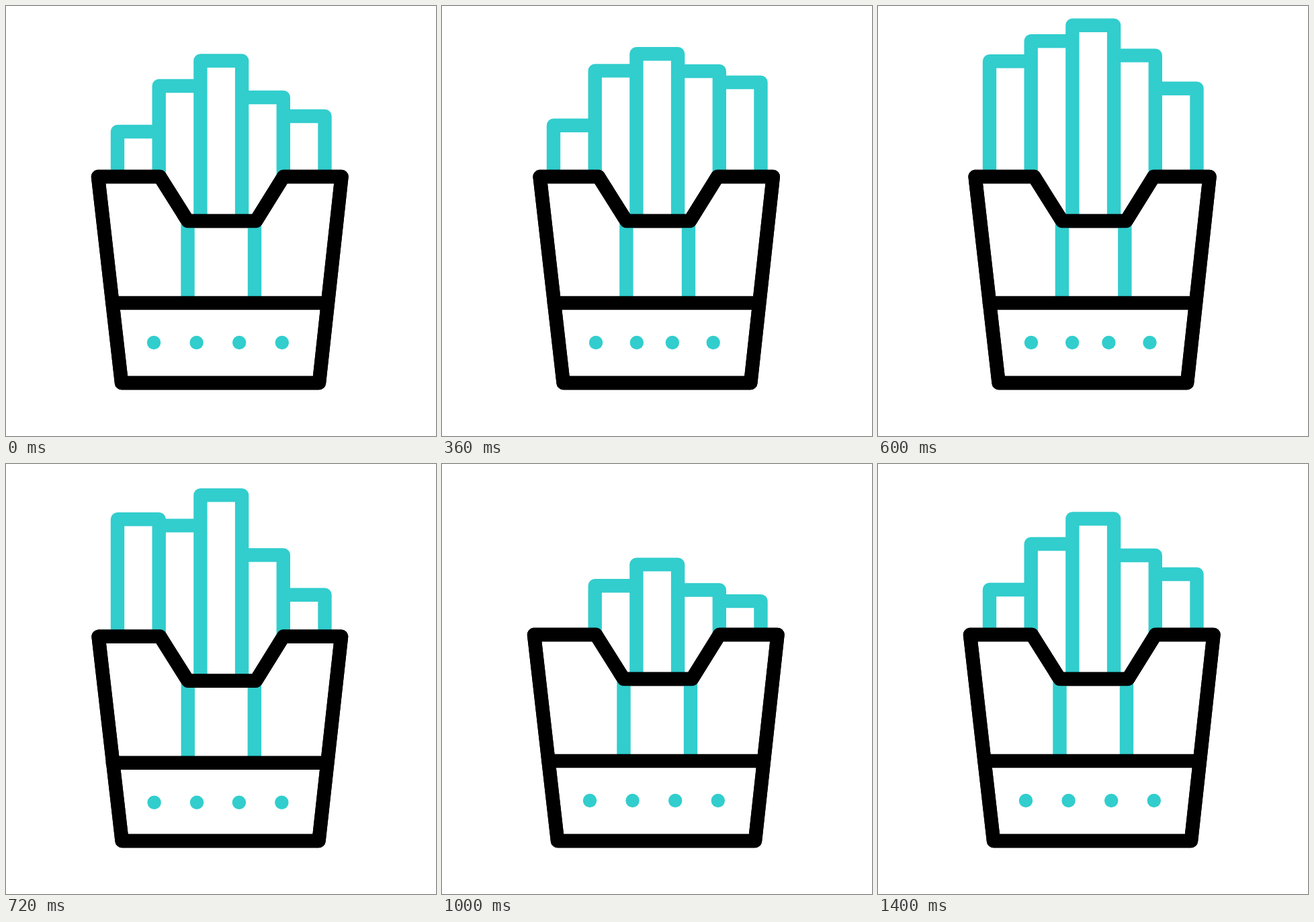
An HTML page that plays this animation: 640x640 px, repeating every 1480 ms.

```html
<!DOCTYPE html>
<html>
<head>
<meta charset="utf-8">
<title>French fries</title>
<style>
  html, body { margin: 0; height: 100%; overflow: hidden; background: #fff; }
  svg { display: block; width: 100vw; height: 100vh; }
  path { fill: none; stroke-width: 20.4; stroke-linejoin: round; }
  .teal { stroke: #32cdcd; }
  .black { stroke: #000; stroke-linecap: round; }
  #box { fill: #fff; }
  #dots { stroke-linecap: round; }
</style>
</head>
<body>
<svg viewBox="0 0 640 640">
  <g id="all">
    <path id="fries" class="teal"/>
    <path id="box" class="black"/>
    <path id="ribs" class="teal"/>
    <path id="outline" class="black"/>
    <path id="dots" class="teal"/>
  </g>
</svg>
<script>
const LOOP = 1480, STEP = 40;
const RISE = 380, FALL = 355, RECOVER = 320;

// Each fry jumps from rest to peak, sinks to low and returns, after its own delay
const fries = [
  { delay: 290, rest: 187, peak: 73, low: 265 },
  { delay: 210, rest: 119, peak: 52, low: 186 },
  { delay: 250, rest: 81.5, peak: 28, low: 150 },
  { delay: 160, rest: 136, peak: 64, low: 204 },
  { delay: 115, rest: 164, peak: 94, low: 237 }
];

// Sine ease from 0 to 1 between two times
function ease(t, from, to) {
  const u = Math.min(Math.max((t - from) / (to - from), 0), 1);
  return (1 - Math.cos(Math.PI * u)) / 2;
}

function fryTop(t, { delay, rest, peak, low }) {
  const top = delay + RISE, bottom = top + FALL;
  return rest + (peak - rest) * ease(t, delay, top)
    + (low - peak) * ease(t, top, bottom)
    + (rest - low) * ease(t, bottom, bottom + RECOVER);
}

// Positive widens and tilts the box, negative squeezes it
const stretchAt = t =>
  1.18 * ease(t, 0, 200) - 2.18 * ease(t, 200, 430) + ease(t, 430, 760);

const dropAt = t => 19 * (ease(t, 680, 840) - ease(t, 840, 1000));

const set = (id, d) => document.getElementById(id).setAttribute('d', d);

function draw(t) {
  const k = stretchAt(t), tilt = Math.max(k, 0);
  const dy = dropAt(t), rim = 254 + dy, notch = 320 + dy, band = 442 + dy;
  const sway = 1.8 * Math.abs(k);
  const left = sway - 14.2 * k, right = sway + 14.2 * k;
  const innerLeft = 0.45 * left, innerRight = 0.45 * right;

  document.getElementById('all').setAttribute('transform', `rotate(${1.69 * tilt} 500 394)`);

  set('fries', fries.map((fry, i) => {
    const x = 166 + 61.7 * i;
    return `M${x} 350V${fryTop(t, fry)}h61.7V350`;
  }).join(''));

  const shape = `M${137 + left} ${rim}H${229 + innerLeft}L${270.5 + innerLeft} ${notch}` +
    `H${372 + innerRight}L${413 + innerRight} ${rim}H${499.5 + right}` +
    `L${466 + right} 561H${172 + left}Z`;
  set('box', shape);
  set('ribs', `M${270.5 + innerLeft} ${notch}V${band}M${370 + innerRight} ${notch}V${band}`);
  set('outline', `${shape}M${158 + left} ${band}H${479 + right}`);

  // Dots move in two pairs, each pair opening with the stretch
  let dots = '';
  for (let i = 0; i < 4; i++) {
    const side = i < 2 ? left - sway : right + sway;
    const x = 220 + 63.6 * i + side + (i % 2 ? 2.6 : -2.6) * k;
    dots += `M${x} ${501 + dy}h.01`;
  }
  set('dots', dots);
}

function frame() {
  draw(Math.floor(performance.now() % LOOP / STEP) * STEP);
  requestAnimationFrame(frame);
}
frame();
</script>
</body>
</html>
```
